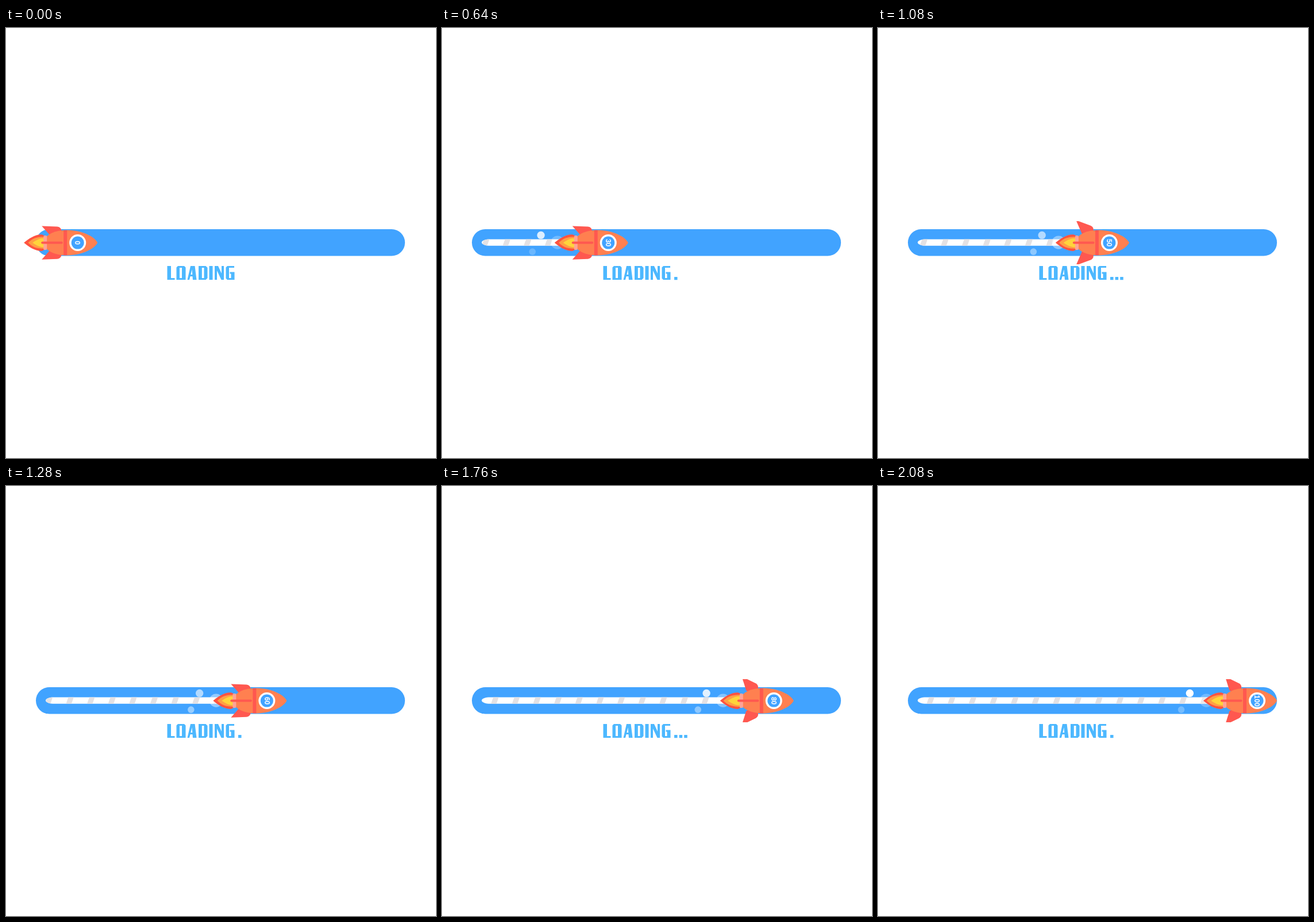
Recreate the animation shown at these times as an HTML page. Size 748 by 748 pixels, loop 2.12 s.

```html
<!DOCTYPE html>
<html lang="en">
<head>
<meta charset="utf-8">
<title>Loading</title>
<style>
  html, body { margin: 0; width: 100%; height: 100%; overflow: hidden; background: #fff; }
  svg { display: block; width: 100%; height: 100%; }
  #count { font: bold 12px "Liberation Sans", Arial, sans-serif; fill: #fff; text-anchor: middle; }
</style>
</head>
<body>
<svg viewBox="0 0 748 748">
  <defs>
    <clipPath id="trackClip"><path id="trackShape"/></clipPath>
    <clipPath id="finClip"><rect x="0" y="-37.5" width="140" height="75"/></clipPath>
    <path id="fin" d="M31 -29.2 L58 -28.2 Q65 -27.5 65.5 -20 L66 -8 L48 -10 Z"/>
  </defs>

  <rect x="52" y="350" width="642" height="46.5" rx="23.25" fill="#41a3ff"/>

  <g clip-path="url(#trackClip)">
    <rect x="60" y="360" width="640" height="26" fill="#fff"/>
    <path id="stripes" fill="#e3e1e4"/>
  </g>

  <g id="rocket">
    <g fill="#fff">
      <circle class="bubble" cx="5.2" cy="-.5" r="11.7"/>
      <circle class="bubble" cx="-23.7" cy="-13.2" r="6.7"/>
      <circle class="bubble" cx="-38.5" cy="15.5" r="5.8"/>
    </g>
    <path d="M0 0 C8 -7 20 -15 31 -14.3 Q36 -13 37 -10 V10 Q36 13 31 14.3 C20 15 8 7 0 0Z" fill="#ff5340"/>
    <path id="flameMid" fill="#ff9f45"/>
    <path id="flameCore" fill="#ffd43b"/>
    <g clip-path="url(#finClip)" fill="#ff5850">
      <use href="#fin" id="finTop"/>
      <g transform="scale(1 -1)"><use href="#fin" id="finLow"/></g>
    </g>
    <path d="M38 -9 C46 -19 62 -22 76 -22 C100 -21.5 123 -11 128 0 C123 11 100 21.5 76 22 C62 22 46 19 38 9Z" fill="#ff8050"/>
    <rect x="34" y="-12.5" width="6" height="25" rx="2" fill="#ffa396"/>
    <rect x="30" y="-2.2" width="37.5" height="4" rx="2" fill="#ff5850"/>
    <rect x="69" y="-21.7" width="6" height="43.4" fill="#ff5850"/>
    <circle cx="93.5" cy="0" r="14.5" fill="#fff"/>
    <circle cx="93.5" cy="0" r="11" fill="#41a3ff"/>
    <text id="count" transform="translate(93.5 0) rotate(90)" y="4.2">0</text>
  </g>

  <g fill="#4db8ff" fill-rule="evenodd" role="img" aria-label="LOADING">
    <path d="M280.5 414 H287 V435 H293.5 V438 H280.5Z"/>
    <path d="M299 414 H310 L312.5 416.5 V438 H296.5 V416.5Z M302 417 V435 H306 V417Z"/>
    <path d="M321 414 H328.5 L331.5 438 H325 L324.4 432 H320.6 L319 438 H315.5Z M323.4 420 L321.4 429 H324.2Z"/>
    <path d="M335 414 H347.5 L350.5 417 V435 L347.5 438 H335Z M340.8 417 V435 H344.5 V417Z"/>
    <path d="M353.5 414 H359.5 V438 H353.5Z"/>
    <path d="M363 414 H369 L375 427 V414 H379 V438 H374.5 L367 422 V438 H363Z"/>
    <path d="M385 414 H397 V417 H388 V435 H391.5 V427.5 H389.5 V424.5 H397.5 V438 H385 L382.5 435.5 V416.5Z"/>
  </g>
  <g fill="#4db8ff">
    <rect class="dot" x="404" y="433" width="5.5" height="5.2"/>
    <rect class="dot" x="412.6" y="433" width="5.5" height="5.2"/>
    <rect class="dot" x="421.2" y="433" width="5.5" height="5.2"/>
  </g>
</svg>
<script>
const STEP = 40, STEPS = 53, MID_Y = 373.6;
const START_X = 31.2, SPEED = 10.285;
const STRIPE_GAP = 36.6, STRIPE_SPEED = 13.65, STRIPE_PHASE = -32.9;

const byId = id => document.getElementById(id);
const bubbles = [...document.querySelectorAll('.bubble')];
const dots = [...document.querySelectorAll('.dot')];

// opacity of the big, upper and lower bubble at each step
const fades = [
  [0, 0, 1, 0], [8, .13, .95, 0], [16, .25, .82, .22], [27, .4, .6, .4],
  [36, .46, .6, .5], [44, .36, .85, .4], [52, .26, 1, .27]
];

function fade(n, col) {
  const i = Math.max(1, fades.findIndex(row => row[0] >= n));
  const a = fades[i - 1], b = fades[i];
  return a[col] + (b[col] - a[col]) * (n - a[0]) / (b[0] - a[0]);
}

// distance from the start of a back-and-forth cycle
const swing = (n, period) => Math.min(n % period, period - n % period);

function flame(tip, half) {
  return `M${tip} 0 C${tip + 7} ${-half * .6} ${tip + 12} ${-half} 35 ${-half}` +
    `H37 V${half} H35 C${tip + 12} ${half} ${tip + 7} ${half * .6} ${tip} 0Z`;
}

function stripePath(n) {
  const shift = ((STRIPE_PHASE + n * STRIPE_SPEED) % STRIPE_GAP + STRIPE_GAP) % STRIPE_GAP;
  let d = '';
  for (let x = 36.6 + shift; x < 640; x += STRIPE_GAP)
    d += `M${x - 2.5} 367 h9.5 l-4.5 12.5 h-9.5Z`;
  return d;
}

function draw(n) {
  const x = START_X + n * SPEED;
  const flap = swing(n, 8);
  const end = x + 20;

  byId('rocket').setAttribute('transform', `translate(${x} ${MID_Y})`);
  byId('finTop').setAttribute('transform', `rotate(${flap * 6} 65 -20)`);
  byId('finLow').setAttribute('transform', `rotate(${flap * 6} 65 -20)`);
  byId('flameMid').setAttribute('d', flame(7.3 - flap * .4, 10.3));
  byId('flameCore').setAttribute('d', flame(15 - flap * .4, 7.8));
  byId('count').textContent = Math.floor(n / 5) * 10;

  byId('trackShape').setAttribute('d', end > 84
    ? `M69 373 C69 369.5 76 367.5 84 367.5 H${end} V378.8 H84 C76 378.8 69 376.5 69 373Z` : 'M0 0');
  byId('stripes').setAttribute('d', stripePath(n));

  bubbles.forEach((b, i) => b.setAttribute('opacity', fade(n, i + 1)));
  const shown = Math.round(swing(n, 18) / 3);
  dots.forEach((d, i) => d.setAttribute('visibility', i < shown ? 'visible' : 'hidden'));
}

const start = performance.now();
function tick() {
  draw(Math.floor((performance.now() - start) / STEP) % STEPS);
  requestAnimationFrame(tick);
}
tick();
</script>
</body>
</html>
```
